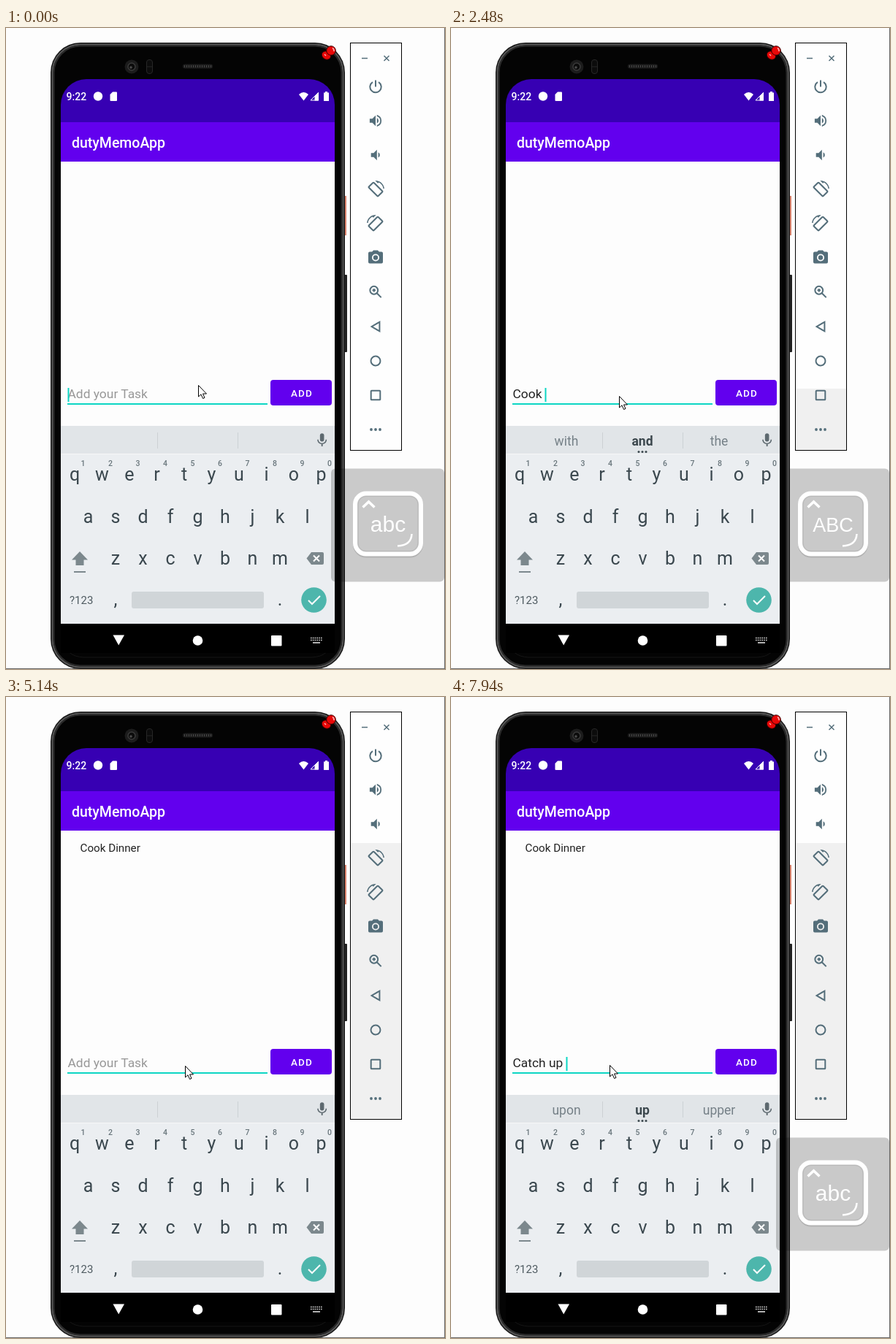
Recreate the animation shown at these times as an HTML page. Size 601 by 878 pixels, loop 8 s.

```html
<!DOCTYPE html>
<html lang="en">
<head>
<meta charset="utf-8">
<title>Task app demo</title>
<style>
  html, body { margin: 0; width: 100%; height: 100%; overflow: hidden; background: #fdfdfd; }
  svg { display: block; position: absolute; left: 0; top: 0; }
  text { font-family: Roboto, sans-serif; white-space: pre; }
  .mid { text-anchor: middle; }
  #tool path, #tool circle, #tool rect { vector-effect: non-scaling-stroke; }
</style>
</head>
<body>
<svg id="stage" width="601" height="878" viewBox="0 0 601 878">
  <defs>
    <clipPath id="capsClip"><rect id="capsEdge" x="445" y="600" width="160" height="165"/></clipPath>
  </defs>

  <rect width="601" height="878" fill="#fdfdfd"/>
  <path d="M600.5 0V878M0 877.5H601" stroke="#6a6a6a"/>

  <!-- emulator toolbar -->
  <rect x="471.500" y="20.500" width="70" height="558" fill="#fefefe"/>
  <rect id="shade" x="472" y="579" width="69" height="0" fill="#f0f0f0"/>
  <rect x="471.500" y="20.500" width="70" height="558" fill="none" stroke="#000"/>
  <g id="tool" fill="#546e7a"></g>

  <!-- phone body -->
  <rect x="462" y="230" width="4" height="54" fill="#d9826c"/>
  <rect x="462" y="338" width="5" height="106" rx="1" fill="#222"/>
  <rect x="61" y="20" width="403" height="858" rx="41" fill="#161616"/>
  <rect x="63.500" y="22.500" width="398" height="853" rx="38.500" fill="none" stroke="#585858" stroke-width="2"/>
  <rect x="65.500" y="24.500" width="394" height="849" rx="36.500" fill="#040404" stroke="#2a2a2a" stroke-width="2"/>
  <path d="M78 838Q82 861 106 862H419Q443 861 447 838" fill="none" stroke="#151515"/>
  <circle cx="172" cy="53" r="9.500" fill="#1c1c1c"/>
  <circle cx="172" cy="53" r="5" fill="#0b0b0b" stroke="#3a3a3a" stroke-width="1.500"/>
  <circle cx="171" cy="54" r="1.800" fill="#4a4a4a"/>
  <rect x="192.500" y="43.500" width="8" height="19" rx="3.500" fill="#0c0c0c" stroke="#272727"/>
  <path d="M193 53H200" stroke="#272727"/>
  <rect x="242" y="49.500" width="41" height="6" rx="3" fill="#1d1d1d"/>
  <path d="M244 52.500H282" stroke="#474747" stroke-width="3" stroke-dasharray="1 2"/>

  <!-- app -->
  <path d="M75 183V105A35 35 0 0 1 110 70H415A35 35 0 0 1 450 105V183Z" fill="#3700b3"/>
  <rect x="75" y="129" width="375" height="54" fill="#6200ee"/>
  <rect x="75" y="183" width="375" height="362" fill="#fdfdfd"/>
  <g fill="#fff">
    <text x="82.500" y="98.500" font-size="14" font-weight="500">9:22</text>
    <circle cx="126" cy="93.500" r="6.200"/>
    <path d="M146 87.500H151Q152 87.500 152 88.500V99Q152 100 151 100H143.500Q142.500 100 142.500 99V91Z"/>
    <path d="M401 91Q407.500 85 414 91L407.500 99.500Z"/>
    <path d="M422.500 93.500L428 88V99.500H422.500Z"/>
    <path d="M417 99L427.500 88.500V99Z" fill="none" stroke="#fff"/>
    <path d="M437 87H440V88.500H442V100H435V88.500H437Z"/>
    <text x="90" y="164" font-size="19.500" font-weight="500">dutyMemoApp</text>
  </g>
  <text id="item" x="101.500" y="212" font-size="15.200" fill="#222">Cook Dinner</text>
  <text id="hint" x="84.500" y="507" font-size="17.400" fill="#989898">Add your Task</text>
  <text id="entry" x="84.500" y="507" font-size="17.400" fill="#222"></text>
  <rect id="composing" x="84.500" y="509" width="11" height="1" fill="#333"/>
  <rect x="84" y="514" width="274" height="2" fill="#0cd6c4"/>
  <rect id="caret" y="493" width="2" height="19" fill="#0cd6c4"/>
  <rect id="lift" x="362" y="484" width="84" height="35" rx="4" fill="#d4d4d4"/>
  <rect id="button" x="362" y="482" width="84" height="35" rx="4"/>
  <text x="405" y="504.500" class="mid" font-size="13.500" font-weight="500" letter-spacing="1.200" fill="#fff">ADD</text>

  <!-- keyboard -->
  <rect x="75" y="545" width="375" height="271" fill="#ebeef1"/>
  <rect x="75" y="545" width="375" height="38" fill="#e1e5e8"/>
  <path d="M75 583.500H450" stroke="#f6f7f8"/>
  <path d="M207.500 554V576M317.500 554V576" stroke="#ccd1d4"/>
  <g id="words" class="mid" font-size="17.500" fill="#758087">
    <text x="158" y="572"></text>
    <text x="262" y="572" fill="#3b474d"></text>
    <text x="367" y="572"></text>
  </g>
  <g id="more" fill="#3b474d"><circle cx="257" cy="580.500" r="1.500"/><circle cx="262" cy="580.500" r="1.500"/><circle cx="267" cy="580.500" r="1.500"/></g>
  <g transform="translate(421.500 553.500) scale(.93)" fill="#5d696f">
    <path d="M12 14a3 3 0 0 0 3-3V5a3 3 0 0 0-6 0v6a3 3 0 0 0 3 3z"/>
    <path d="M17.300 11a5.300 5.300 0 0 1-10.600 0H5a7 7 0 0 0 6 6.720V21h2v-3.280A7 7 0 0 0 19 11z"/>
  </g>
  <g id="keys" class="mid" font-size="25" fill="#3a474e"></g>
  <g fill="#7c888d">
    <path d="M101 717L112 728.500H106.500V736H95.500V728.500H90Z"/>
    <rect x="93" y="744" width="16" height="2"/>
    <path d="M418 718H433Q435 718 435 720V733Q435 735 433 735H418L411.500 726.500Z"/>
  </g>
  <path d="M421 722.500L429 730.500M429 722.500L421 730.500" stroke="#fff" stroke-width="2"/>
  <text x="87" y="789" font-size="15" fill="#4f5b61">?123</text>
  <rect x="172" y="772" width="181" height="23" rx="3" fill="#d0d5d8"/>
  <circle cx="421.500" cy="783.500" r="17.300" fill="#4db6ac"/>
  <path d="M414 784L419 789L430 778" fill="none" stroke="#fff" stroke-width="2"/>

  <!-- navigation bar -->
  <rect x="75" y="816" width="375" height="40" fill="#000"/>
  <g fill="#fff">
    <path d="M146.500 831.500H162L154.200 845.500Z"/>
    <circle cx="262.500" cy="839" r="6.800"/>
    <rect x="363" y="832" width="14.500" height="14.500" rx="1"/>
  </g>
  <path d="M417 835.500H433M417 838.500H433" stroke="#ddd" stroke-width="1.600" stroke-dasharray="1.600 1.200"/>
  <path d="M420 842H430" stroke="#ddd" stroke-width="1.600"/>

  <!-- caps lock notice -->
  <g id="caps" clip-path="url(#capsClip)">
    <rect x="445" y="603.500" width="155" height="155" rx="6" fill="#000" opacity=".205"/>
    <rect x="478" y="639.500" width="90" height="83" rx="15" fill="none" stroke="#b2b2b2" stroke-width="6"/>
    <rect x="478" y="637.500" width="90" height="83" rx="15" fill="#c9c9c9" stroke="#fff" stroke-width="6"/>
    <rect x="482" y="641.500" width="82" height="75" rx="11" fill="none" stroke="#b8b8b8"/>
    <path d="M488.500 656.500L496.500 649L504.500 656.500" fill="none" stroke="#fff" stroke-width="3.500"/>
    <path d="M555.500 693Q555 708.500 536 709.500" fill="none" stroke="#fff" stroke-width="2.500"/>
    <text id="capsText" x="523" y="689.500" class="mid" style="font-family:'Liberation Sans',sans-serif" fill="#fff"></text>
  </g>

  <!-- pushpin -->
  <g fill="#e80808" stroke="#300" stroke-width="1">
    <ellipse cx="438.500" cy="37.500" rx="6.500" ry="5.500" transform="rotate(35 438.500 37.500)"/>
    <circle cx="445" cy="31" r="6.300"/>
    <path d="M447 27.500Q449.500 29 449 32" fill="none" stroke="#ffb0b0" stroke-width="1.500"/>
  </g>
  <path d="M436 36L438 38" stroke="#ffb0b0" stroke-width="1.500"/>

  <path id="mouse" d="M.5.5V16L4 12.800L6.600 18.500L9 17.400L6.500 12H11.500Z" fill="#fff" stroke="#000"/>
</svg>

<script>
const $ = id => document.getElementById(id);

// toolbar icons
const line = 'fill="none" stroke="#546e7a" stroke-width="2"';
const icon = (y, body, scale = .9, flip = 1) =>
  `<g transform="translate(506 ${y}) scale(${scale * flip} ${scale}) translate(-12 -12)">${body}</g>`;
const path = (d, attr = '') => `<path d="${d}" ${attr}/>`;
const turn = `<rect x="3" y="7.200" width="18" height="9.600" rx="1" transform="rotate(45 12 12)" ${line}/>`
  + path('M16.480 2.520c3.270 1.550 5.610 4.720 5.970 8.480h1.500C23.440 4.840 18.290 0 12 0l-.66.03 3.810 3.810z');

$('tool').innerHTML =
  path('M487 41.500H495', 'stroke="#546e7a" stroke-width="1.500"') +
  path('M517.500 38L524.500 45M524.500 38L517.500 45', 'stroke="#546e7a" stroke-width="1.500"') +
  icon(80, path('M12 2.500V12.500M7.500 5.500A8.500 8.500 0 1 0 16.500 5.500', line)) +
  icon(127, path('M3 9v6h4l5 5V4L7 9H3zM16.500 12A4.500 4.500 0 0 0 14 7.970v8.050A4.470 4.470 0 0 0 16.500 12zM14 3.230v2.060a7 7 0 0 1 0 13.420v2.060a9 9 0 0 0 0-17.540z')) +
  icon(174, path('M18.500 12A4.500 4.500 0 0 0 16 7.970v8.050A4.470 4.470 0 0 0 18.500 12zM5 9v6h4l5 5V4L9 9H5z')) +
  icon(221, turn, 1) +
  icon(268, turn, 1, -1) +
  icon(314.500, path('M9 2 7.170 4H4a2 2 0 0 0-2 2v12a2 2 0 0 0 2 2h16a2 2 0 0 0 2-2V6a2 2 0 0 0-2-2h-3.170L15 2zM12 17a5 5 0 1 1 0-10 5 5 0 0 1 0 10z', 'fill-rule="evenodd"') + '<circle cx="12" cy="12" r="3.200"/>', 1) +
  icon(361.500, `<circle cx="9.500" cy="9.500" r="6" ${line}/>` + path('M14 14L20.500 20.500', line) +
    path('M9.500 7V12M7 9.500H12', line)) +
  icon(409, path('M18 5V19L6 12Z', line)) +
  icon(456, `<circle cx="12" cy="12" r="7.200" ${line}/>`) +
  icon(503, `<rect x="5" y="5" width="14" height="14" rx="1" ${line}/>`) +
  [500, 506, 512].map(x => `<circle cx="${x}" cy="550" r="1.900"/>`).join('');

// keyboard letters
const key = (c, x, y, attr = '') => `<text x="${x}" y="${y}" ${attr}>${c}</text>`;
const row = (chars, x, y, attr) => [...chars].map((c, i) => key(c, x + i * 37.5, y, attr)).join('');
$('keys').innerHTML =
  row('qwertyuiop', 94, 620) + row('asdfghjkl', 112.5, 678) + row('zxcvbnm', 150, 735) +
  row('1234567890', 105.5, 600, 'font-size="10.500" font-weight="500" fill="#68757b"') +
  key(',', 150, 791) + key('.', 375, 791);

// each step changes some of the values that came before it
const steps = [
  [0, { text: '', words: '', caret: 1, mouse: [263, 489], caps: 'abc', fade: 1, under: 0, shade: 579, item: 0, press: 0 }],
  [150, { mouse: [258, 492] }],
  [290, { mouse: [244, 499] }],
  [430, { mouse: [234, 503], caret: 0 }],
  [570, { mouse: [230, 504], under: 1, shade: 494 }],
  [990, { caret: 1 }],
  [1290, { caps: 'ABC' }],
  [1440, { text: 'C', words: 'Can C City' }],
  [1590, { caps: 'abc' }],
  [1850, { text: 'Co', words: 'Come Co Could' }],
  [1980, { text: 'Coo', words: 'Cool Coo Cook' }],
  [2110, { text: 'Cook' }],
  [2230, { text: 'Cook ', words: 'Cooking Cook Cooked' }],
  [2480, { caps: 'ABC', words: 'with and the' }],
  [2760, { text: 'Cook D', words: 'Day D Do', shade: 493 }],
  [2880, { text: 'Cook Di', caps: 'abc', words: 'Did Di Dinner' }],
  [3020, { text: 'Cook Din', words: 'Dinner Din Dim' }],
  [3160, { text: 'Cook Dinne' }],
  [3300, { text: 'Cook Dinner' }],
  [3420, { words: 'Dinners Dinner Dinne' }],
  [3820, { mouse: [246, 505] }],
  [3940, { mouse: [302, 504] }],
  [4060, { mouse: [360, 499] }],
  [4180, { mouse: [391, 496] }],
  [4300, { mouse: [393, 495] }],
  [4520, { text: '', words: '', press: 1, fade: .8 }],
  [4640, { item: .06, fade: .52, shade: 200 }],
  [4760, { item: .65, fade: .25 }],
  [4880, { item: 1, fade: 0, press: 0, mouse: [380, 496] }],
  [5010, { mouse: [318, 502] }],
  [5140, { mouse: [245, 505], caret: 0 }],
  [5270, { mouse: [217, 504] }],
  [5400, { caps: 'ABC', fade: 1, under: 0 }],
  [5650, { caret: 1 }],
  [6050, { caret: 0 }],
  [6570, { text: 'C', words: 'Can C City', caret: 1 }],
  [6700, { caps: 'abc' }],
  [6960, { text: 'Ca', words: 'Can Ca Came' }],
  [7090, { text: 'Cat' }],
  [7220, { words: 'Cat Cat Catch' }],
  [7340, { text: 'Catc', words: 'Catch Catc Cats' }],
  [7460, { text: 'Catch', words: 'Catches Catch Catcher' }],
  [7580, { text: 'Catch ', words: 'up the with' }],
  [7700, { text: 'Catch u', words: 'up u us' }],
  [7820, { text: 'Catch up', words: 'upon up upper' }],
  [7940, { text: 'Catch up ' }]
];
const LOOP = 8000;
const states = [];
steps.forEach(([, change], i) => states.push({ ...states[i - 1], ...change }));

const set = (id, attrs) => {
  for (const name in attrs) $(id).setAttribute(name, attrs[name]);
};

function show(s) {
  $('entry').textContent = s.text;
  set('hint', { opacity: s.text ? 0 : 1 });
  set('composing', { opacity: s.text === 'C' ? 1 : 0 });
  const width = s.text ? $('entry').getComputedTextLength() : -.5;
  set('caret', { x: 84.5 + Math.round(width), opacity: s.caret });

  const words = s.words.split(' ');
  [...$('words').children].forEach((el, i) => el.textContent = words[i] || '');
  $('words').children[1].setAttribute('font-weight', words[1] === 'Ca' ? 400 : 700);
  set('more', { opacity: s.words ? 1 : 0 });

  $('capsText').textContent = s.caps;
  set('capsText', { 'font-size': s.caps === 'abc' ? 30 : 27 });
  set('caps', { opacity: s.fade });
  set('capsEdge', { x: s.under ? 464 : 445 });

  set('shade', { y: s.shade, height: 579 - s.shade });
  set('item', { opacity: s.item });
  set('button', { fill: s.press ? '#883bf2' : '#6200ee' });
  set('lift', { opacity: s.press });
  set('mouse', { transform: `translate(${s.mouse})` });
}

let current = -1;
const start = performance.now();
function tick() {
  const t = (performance.now() - start) % LOOP;
  const i = steps.findLastIndex(([at]) => at <= t);
  if (i !== current) show(states[current = i]);
  requestAnimationFrame(tick);
}
tick();
</script>
</body>
</html>
```
